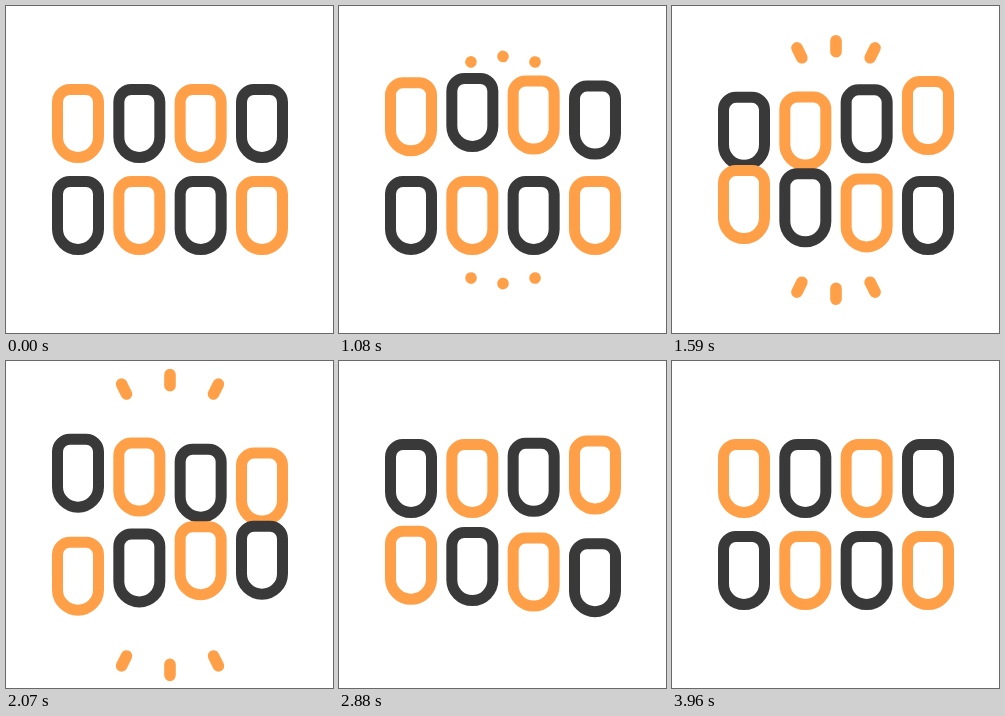
Write an HTML page with a canvas that moves like this. It is 327 px wide and 327 px high and loops after 4500 ms.

```html
<!DOCTYPE html>
<html>
<head>
<meta charset="utf-8">
<style>
html, body { margin: 0; width: 100%; height: 100%; overflow: hidden; background: #fff; }
canvas { display: block; }
</style>
</head>
<body>
<canvas id="stage" width="327" height="327"></canvas>
<script>
const ctx = document.getElementById('stage').getContext('2d');
const ORANGE = '#ffa048', DARK = '#393939';
const LOOP = 4500, START = 330, STAGGER = 180;
const BLINK = 210, BLINK_END = 3060;

// Vertical swing of one tooth: [local time, offset]
const SWING = [[0, 0], [570, -11], [1170, 8.7], [1770, -5.4], [2370, 0]];

// Rays of the upper half: inner point, outer point
const RAYS = [
  [132, 56, 113.5, 19],
  [164, 50.5, 164, 9],
  [196, 56, 214.5, 19]
];

const ease = u => {
  u = Math.min(1, Math.max(0, u));
  return u * u * (3 - 2 * u);
};

function swing(t) {
  for (let i = 1; i < SWING.length; i++) {
    const [t0, a] = SWING[i - 1], [t1, b] = SWING[i];
    if (t < t1) return a + (b - a) * ease((t - t0) / (t1 - t0));
  }
  return 0;
}

function tooth(x, y, color) {
  ctx.beginPath();
  ctx.roundRect(x, y, 41, 68, [12.5, 12.5, 20.5, 20.5]);
  ctx.strokeStyle = color;
  ctx.lineWidth = 11;
  ctx.stroke();
}

function rays(t) {
  const head = ease((t - 1050) / 1290), tail = ease((t - 1320) / 1290);
  if (head <= 0 || tail >= 1) return;
  ctx.strokeStyle = ORANGE;
  ctx.lineWidth = 11.6;
  ctx.lineCap = 'round';
  for (const [x0, y0, x1, y1] of RAYS) {
    const x = k => x0 + (x1 - x0) * k, y = k => y0 + (y1 - y0) * k;
    for (const flip of [false, true]) {
      const side = v => flip ? 328 - v : v;
      ctx.beginPath();
      ctx.moveTo(x(tail), side(y(tail)));
      ctx.lineTo(x(head) + 0.01, side(y(head)));
      ctx.stroke();
    }
  }
}

function draw(t) {
  ctx.fillStyle = '#fff';
  ctx.fillRect(0, 0, 327, 327);
  const swapped = t >= START && t < BLINK_END &&
    Math.floor((t - START) / BLINK) % 2 === 0;
  for (let i = 0; i < 8; i++) {
    const col = i % 4, row = i >> 2;
    const orange = ((col + row) % 2 === 0) !== swapped;
    const y = 83.5 + row * 92 + swing(t - START - i * STAGGER);
    tooth(51.5 + col * 61.33, y, orange ? ORANGE : DARK);
  }
  rays(t);
}

const begin = performance.now();
function tick() {
  draw((performance.now() - begin) % LOOP);
  requestAnimationFrame(tick);
}
tick();
</script>
</body>
</html>
```
